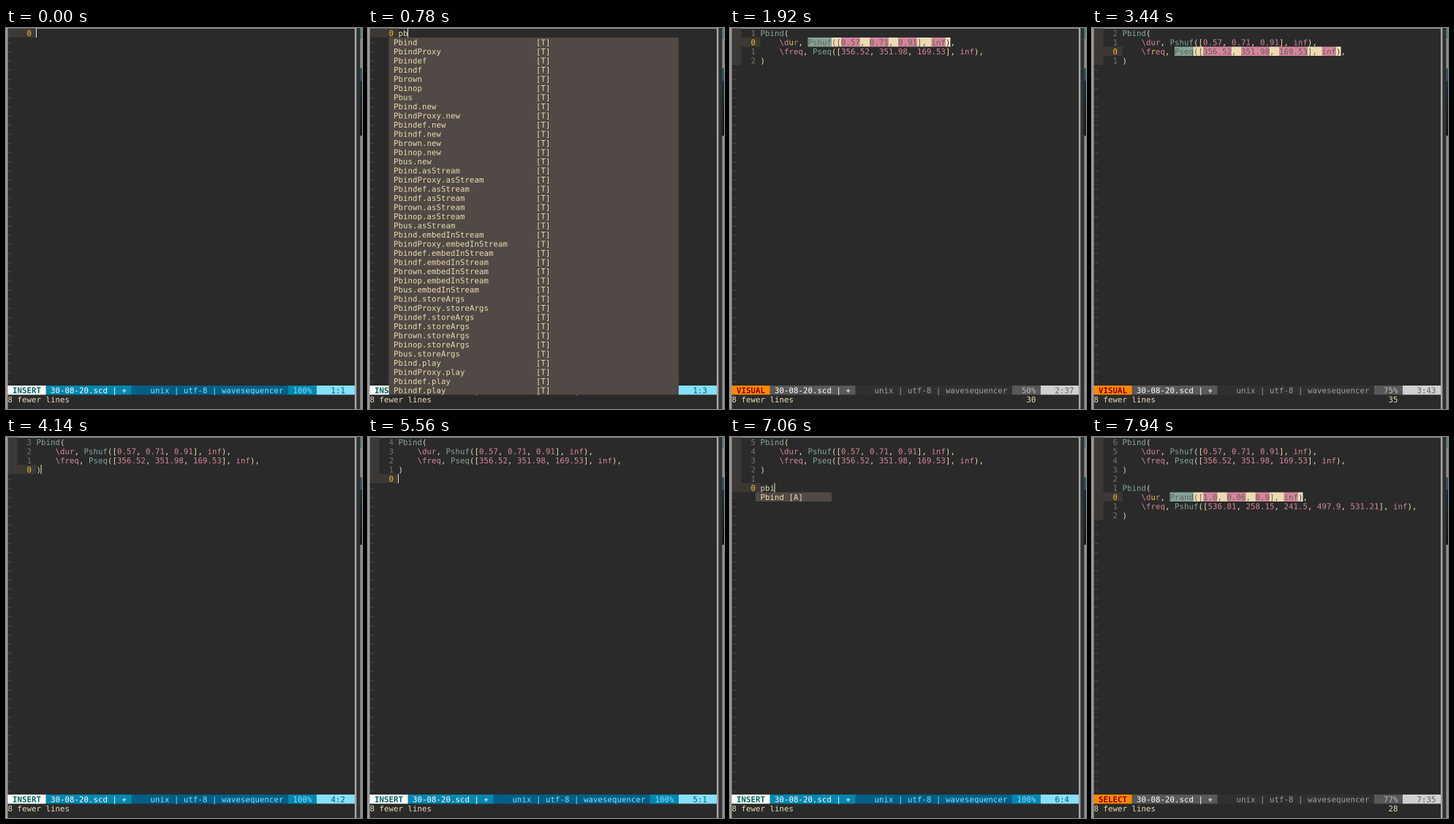
Animation, 487 px wide and 520 px high, one loop 8 s. Source, as an HTML page with a canvas:

```html
<!DOCTYPE html>
<html lang="en">
<head>
<meta charset="utf-8">
<title>Editor session</title>
<style>
  html, body { margin: 0; width: 100%; height: 100%; overflow: hidden; background: #2a2a2a; }
  canvas { display: block; width: 487px; height: 520px; }
</style>
</head>
<body>
<canvas id="screen" width="974" height="1040"></canvas>
<script>
// The terminal is drawn on a whole-pixel grid at double size and shown at half size.
const LOOP = 8000, CELL_W = 13, CELL_H = 25, LEFT = 5, TOP = 1, BASELINE = 21;
const STATUS_ROW = 39, CODE_COL = 6;
const FONT = '21.33px "DejaVu Sans Mono", monospace';
const C = {
  back: '#2a2a2a', fg: '#ebdbb2', pink: '#d3869b', aqua: '#83a598', gutter: '#3c3836',
  number: '#7c6f64', current: '#fabd2f', tilde: '#504945', menu: '#504945',
  selText: '#665c54', hint: '#dfd52f', cursor: '#f2e5bc'
};

// Status bar colours as [text, background] per segment.
const insertTheme = {
  mode: ['#005f5f', '#ffffff'], file: ['#ffffff', '#0087af'], info: ['#87dfff', '#005f87'],
  pct: ['#87dfff', '#0087af'], pos: ['#005f5f', '#87dfff']
};
const selectTheme = {
  mode: ['#870000', '#ff8700'], file: ['#ffffff', '#585858'], info: ['#9e9e9e', '#303030'],
  pct: ['#bcbcbc', '#585858'], pos: ['#606060', '#d0d0d0']
};

const blockA = [
  'Pbind(',
  '    \\dur, Pshuf([0.57, 0.71, 0.91], inf),',
  '    \\freq, Pseq([356.52, 351.98, 169.53], inf),',
  ')'
];
const blockB = [
  'Pbind(',
  '    \\dur, Prand([1.0, 0.06, 0.9], inf),',
  '    \\freq, Pshuf([536.81, 258.15, 241.5, 497.9, 531.21], inf),',
  ')'
];
const full = [...blockA, '', ...blockB];
const typed = text => [...blockA, '', text];

const stems = ['Pbind', 'PbindProxy', 'Pbindef', 'Pbindf', 'Pbrown', 'Pbinop', 'Pbus'];
const suffixes = ['', '.new', '.asStream', '.embedInStream', '.storeArgs', '.play'];
const longItems = Array.from({ length: 39 }, (_, i) =>
  (stems[i % 7] + suffixes[Math.floor(i / 7)]).padEnd(30) + '[T]');

const popup = (items, col = 5, width = 16) => ({ items, col, width });
const longMenu = popup(longItems, 4, 61);
const bindMenu = popup(['Pbind [A]']);
const snippetMenu = popup(['Pbind', 'Pbindef', 'Pbindf', 'PbindProxy', 'pbind', 'pbind2', 'pbind3', 'pbindef']
  .map((name, i) => name.padEnd(11) + (i < 4 ? '[A]' : '[snip] pattern')), 5, 32);

// [time, lines, cursor row, mode, popup]
const steps = [
  [0, [''], 0, 'INSERT'],
  [500, ['p'], 0, 'INSERT'],
  [640, ['pb'], 0, 'INSERT', popup(['pb [A]'])],
  [780, ['pb'], 0, 'INSERT', longMenu],
  [1060, ['pbi'], 0, 'INSERT'],
  [1200, ['pbin'], 0, 'INSERT'],
  [1340, ['pbind'], 0, 'INSERT'],
  [1480, ['pbind'], 0, 'INSERT', snippetMenu],
  [1920, blockA, 1, 'VISUAL'],
  [2060, blockA, 1, 'SELECT'],
  [3440, blockA, 2, 'VISUAL'],
  [3560, blockA, 2, 'SELECT'],
  [4020, blockA, 3, 'INSERT'],
  [5560, [...blockA, ''], 4, 'INSERT'],
  [5940, typed(''), 5, 'INSERT'],
  [6380, typed('p'), 5, 'INSERT'],
  [6680, typed('pb'), 5, 'INSERT', popup(['Pbind [A]', 'pb    [A]'])],
  [6800, typed('pb'), 5, 'INSERT', longMenu],
  [7060, typed('pbi'), 5, 'INSERT', bindMenu],
  [7200, typed('pbin'), 5, 'INSERT', bindMenu],
  [7340, typed('pbind'), 5, 'INSERT', bindMenu],
  [7420, typed('pbind'), 5, 'INSERT'],
  [7500, typed('pbind'), 5, 'INSERT', snippetMenu],
  [7900, full, 6, 'VISUAL'],
  [7940, full, 6, 'SELECT']
];

const canvas = document.getElementById('screen');
const ctx = canvas.getContext('2d', { alpha: false });

function rect(x, y, width, height, color) {
  ctx.fillStyle = color;
  ctx.fillRect(x, y, width, height);
}

function put(row, col, text, color, background, bold = false) {
  const x = LEFT + col * CELL_W, y = TOP + row * CELL_H;
  if (background) rect(x, y, text.length * CELL_W, CELL_H, background);
  ctx.font = (bold ? 'bold ' : '') + FONT;
  ctx.fillStyle = color;
  [...text].forEach((char, i) => ctx.fillText(char, x + i * CELL_W, y + BASELINE));
}

function drawFrame() {
  const { width, height } = canvas;
  rect(0, 0, width, height, C.back);
  rect(0, 0, 958, 2, '#999');
  rect(0, 0, LEFT, height, '#9c9c9c');
  rect(954, 0, 5, height, '#a4a4a4');
  rect(959, 0, 10, height, '#303030');

  // Sliver of the window behind.
  rect(969, 0, 5, height, '#8f8f8f');
  rect(969, 0, 5, 30, '#5d8284');
  rect(969, 110, 5, 34, '#265866');
  const shade = ctx.createLinearGradient(0, 144, 0, 294);
  shade.addColorStop(0, '#17303e');
  shade.addColorStop(1, '#101316');
  rect(969, 144, 5, 150, shade);
}

function drawCode(row, line, selection) {
  for (const match of line.matchAll(/(\\\w+|\binf\b|\d+\.\d+)|(P[a-z]+)|./g)) {
    const [text, value, name] = match, at = match.index;
    const color = value ? C.pink : name ? C.aqua : C.fg;
    const selected = selection && at >= selection.from && at <= selection.to;
    if (selected && at === selection.to) put(row, CODE_COL + at, text, '#282828', '#f5e8c2');
    else if (selected) put(row, CODE_COL + at, text, C.selText, color);
    else put(row, CODE_COL + at, text, color);
    if (selection && text[0] === '\\') put(row, CODE_COL + at + 2, text[2], C.hint, C.back);
  }
}

function drawStatus(mode, percent, line, column) {
  const theme = mode === 'INSERT' ? insertTheme : selectTheme;
  const segment = (col, text, part, bold) => put(STATUS_ROW, col, text, ...theme[part], bold);
  segment(0, ` ${mode} `, 'mode', true);
  segment(8, ' 30-08-20.scd | + ', 'file');
  segment(26, '    unix | utf-8 | wavesequencer ', 'info');
  segment(59, ` ${String(percent).padStart(3)}% `, 'pct');
  segment(65, ` ${String(line).padStart(3)}:${String(column).padEnd(2)} `, 'pos');
}

function draw([, lines, cursor, mode, menu]) {
  drawFrame();
  const line = lines[cursor];
  const selection = mode === 'INSERT' ? null : { from: line.indexOf('P'), to: line.lastIndexOf(')') };

  for (let row = 0; row < STATUS_ROW; row++) {
    if (row >= lines.length) {
      put(row, 0, '~', C.tilde);
      continue;
    }
    const here = row === cursor;
    put(row, 0, '  ', C.fg, C.gutter);
    put(row, 2, `  ${Math.abs(row - cursor)} `, here ? C.current : C.number, here && C.gutter);
    drawCode(row, lines[row], here && selection);
  }

  // The indent is a single tab, so the byte column is three less than the visible one.
  const column = selection ? selection.to - 2 : line.length + 1;
  drawStatus(mode, Math.floor(100 * (cursor + 1) / lines.length), cursor + 1, column);
  put(40, 0, '8 fewer lines', C.fg);

  if (menu) {
    menu.items.slice(0, STATUS_ROW - cursor).forEach((item, i) =>
      put(cursor + 1 + i, menu.col, (' ' + item).padEnd(menu.width), C.fg, C.menu));
  }

  if (selection) put(40, 62, String(selection.to - selection.from + 1), C.fg);
  else rect(LEFT + (CODE_COL + line.length) * CELL_W - 1, TOP + cursor * CELL_H, 2, CELL_H, C.cursor);
}

const start = performance.now();
let shown = null;

function tick() {
  const time = (performance.now() - start) % LOOP;
  const step = steps.findLast(([at]) => at <= time);
  if (step !== shown) draw(shown = step);
  requestAnimationFrame(tick);
}
tick();
</script>
</body>
</html>
```
